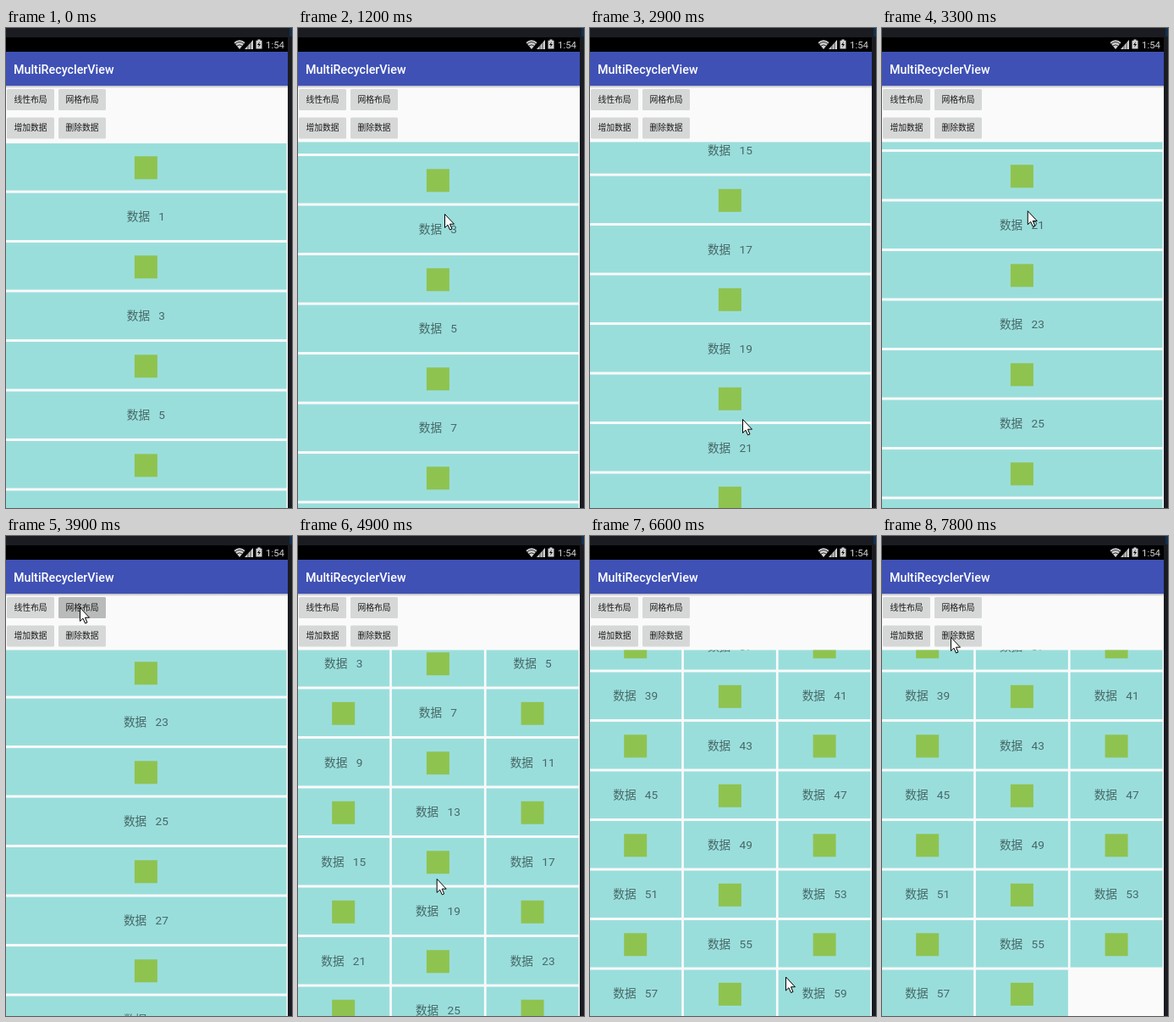
Write an HTML page that moves like this. It is 338 px wide and 566 px high and loops after 8 s.

```html
<!DOCTYPE html>
<html lang="zh">
<head>
<meta charset="utf-8">
<title>MultiRecyclerView</title>
<style>
html, body { margin: 0; width: 100%; height: 100%; overflow: hidden; background: #1b1c21; }
svg { display: block; width: 338px; height: 566px; }
text { font-family: Roboto, "Noto Sans CJK SC", "Noto Sans CJK", sans-serif; white-space: pre; }
.btn text { font-size: 9.8px; fill: #1c1c1c; text-anchor: middle; }
.item rect { fill: #9adedc; }
.item text { font-size: 13.7px; fill: #466866; text-anchor: middle; }
.item .icon { fill: #8fc350; }
</style>
</head>
<body>
<svg viewBox="0 0 338 566">
  <defs>
    <clipPath id="view"><rect y="134.5" width="333" height="432"/></clipPath>
    <linearGradient id="shade" x2="0" y2="1">
      <stop offset="0" stop-color="#b4b4b8"/>
      <stop offset="1" stop-color="#fafafa"/>
    </linearGradient>
  </defs>
  <rect width="338" height="566" fill="#1b1c21"/>
  <rect x="335" width="3" height="10" fill="#12304f"/>
  <rect y="11" width="333" height="17.5" fill="#000"/>
  <rect y="28" width="333" height="538" fill="#fafafa"/>
  <rect y="28" width="333" height="40" fill="#3f51b5"/>
  <rect y="68" width="333" height="3" fill="url(#shade)"/>
  <text x="9" y="53.6" font-size="14.3" font-weight="500" fill="#fff">MultiRecyclerView</text>

  <g fill="#d0d0d0">
    <path d="M269.5 17Q276 11.5 282.5 17L276 25Z"/>
    <path d="M271 18.6Q276 14.6 281 18.6M273 21Q276 18.6 279 21" fill="none" stroke="#000" stroke-width=".8"/>
    <path d="M292 14V25H282Z"/>
    <path d="M286 14V25M289 14V25" stroke="#000" stroke-width=".7"/>
    <path d="M297.5 13.5H300.5V14.8H302.5V24.5H295.5V14.8H297.5Z"/>
    <path d="M300 16L297 20H299L298 23L301 19H299Z" fill="#000"/>
    <text x="307" y="23.8" font-size="11.4">1:54</text>
  </g>

  <g id="buttons"></g>
  <g id="list" clip-path="url(#view)"></g>
  <path id="glow" d="M6 566Q163 500 320 566Z" fill="#3f51b5"/>
  <path id="cursor" d="M.5 .5V16.5L4 13.2L6.6 19L9 18L6.5 12.2H11.5Z" fill="#fff" stroke="#000"/>
</svg>
<script>
const LOOP = 8000, STEP = 100;
const COUNT = 60, PITCH = 58.5, HEIGHT = 55.5, TOP = 163.8;
const COLS = 3, COL_PITCH = 111.7, CELL = 109, LEFT = -0.8;
const GRID_AT = 4000, DELETE_AT = 7600;

// [time, scroll]
const linearScroll = [[0, 0], [1000, 0], [1200, 102], [1600, 430], [2100, 684],
  [2900, 897.5], [3000, 908], [3300, 1160], [3700, 1290]];
const gridScroll = [[4800, 0], [5000, 150], [5500, 638.5], [5600, 736]];
// [time, x, y]
const pointer = [[400, 205, 122], [1000, 176, 332], [1200, 173, 219], [1300, 172, 160],
  [1500, 174, 200], [2100, 178, 379], [2900, 180, 461], [3000, 180, 450],
  [3250, 176, 240], [3700, 87, 84], [3900, 87, 84], [4700, 165, 500],
  [5100, 162, 300], [5500, 161, 283], [5800, 163, 259], [6500, 239, 541], [7100, 81, 119]];

const $ = id => document.getElementById(id);

function add(parent, tag, attrs, content) {
  const el = document.createElementNS("http://www.w3.org/2000/svg", tag);
  set(el, attrs);
  if (content) el.textContent = content;
  return parent.appendChild(el);
}

function set(el, attrs) {
  for (const k in attrs) el.setAttribute(k, attrs[k]);
}

// Monotone cubic through the keys, reading column c
function track(keys, t, c = 1) {
  const last = keys.length - 1;
  if (t <= keys[0][0]) return keys[0][c];
  if (t >= keys[last][0]) return keys[last][c];
  const i = keys.findIndex(k => k[0] > t) - 1;
  const rate = j => (keys[j + 1][c] - keys[j][c]) / (keys[j + 1][0] - keys[j][0]);
  const slope = j => {
    if (j === 0) return rate(0);
    if (j === last) return rate(last - 1);
    const a = rate(j - 1), b = rate(j);
    return a * b > 0 ? 2 * a * b / (a + b) : 0;
  };
  const span = keys[i + 1][0] - keys[i][0], p = (t - keys[i][0]) / span, q = 1 - p;
  return keys[i][c] * q * q * (1 + 2 * p) + keys[i + 1][c] * p * p * (3 - 2 * p)
    + span * p * q * (slope(i) * q - slope(i + 1) * p);
}

const buttons = ["线性布局", "网格布局", "增加数据", "删除数据"].map((label, i) => {
  const x = 1 + 61 * (i % 2), y = 72 + 33.4 * Math.floor(i / 2);
  const g = add($("buttons"), "g", { class: "btn" });
  const box = add(g, "rect", { x, y, width: 56, height: 25, rx: 1.5 });
  add(g, "text", { x: x + 28, y: y + 16 }, label);
  return box;
});

const items = Array.from({ length: COUNT }, (_, i) => {
  const g = add($("list"), "g", { class: "item" });
  const box = add(g, "rect", { y: -HEIGHT / 2, height: HEIGHT });
  if (i % 2) add(g, "text", { y: 4.9 }, "数据   " + i);
  else add(g, "rect", { class: "icon", x: -13.5, y: -12.5, width: 27, height: 27 });
  return { g, box };
});

function draw(t) {
  const grid = t >= GRID_AT;
  const scroll = track(grid ? gridScroll : linearScroll, t);
  const width = grid ? CELL : CELL + COL_PITCH * (COLS - 1);
  const cols = grid ? COLS : 1;

  items.forEach(({ g, box }, i) => {
    const x = LEFT + width / 2 + (i % cols) * COL_PITCH;
    const y = TOP + Math.floor(i / cols) * PITCH - scroll;
    const shown = y > 100 && y < 600;
    g.style.display = shown ? "" : "none";
    if (!shown) return;
    set(g, { transform: `translate(${x} ${y})` });
    set(box, { x: -width / 2, width });
  });
  const gone = Math.min(1, Math.max(0, (t - DELETE_AT) / 200));
  set(items[COUNT - 1].g, { opacity: 1 - gone });

  const within = (from, len) => t >= from && t < from + len;
  const pressed = within(3900, STEP) ? 1 : within(DELETE_AT, STEP) ? 3 : -1;
  buttons.forEach((b, i) => set(b, { fill: i === pressed ? "#b9baba" : "#d6d7d7" }));

  const fade = (t - 5600) / 900;
  set($("glow"), { opacity: fade > 0 && fade < 1 ? 0.2 * (1 - fade) : 0 });

  $("cursor").style.display = t < 400 ? "none" : "";
  set($("cursor"), { transform: `translate(${track(pointer, t, 1)} ${track(pointer, t, 2)})` });
}

const start = performance.now();
function tick() {
  const t = (performance.now() - start) % LOOP;
  draw(Math.floor(t / STEP) * STEP);
  requestAnimationFrame(tick);
}
tick();
</script>
</body>
</html>
```
